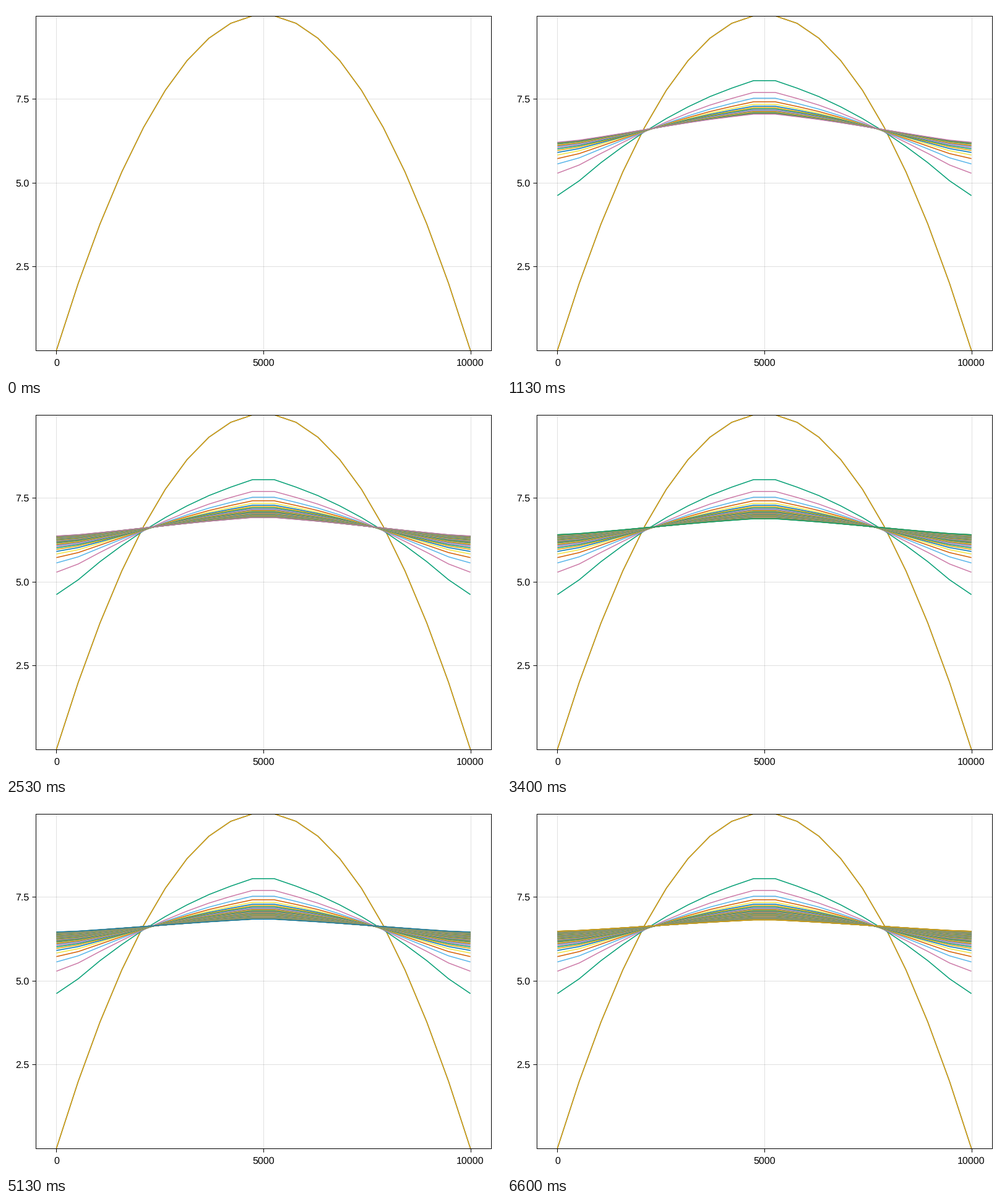
A matplotlib script for the animation above (6670 ms loop, 800x600 px).

```python
import matplotlib.pyplot as plt
import numpy as np
from matplotlib.animation import FuncAnimation

W, H, DPI = 800, 600, 100
FRAMES, LOOP_MS = 100, 6670
NODES, LENGTH = 20, 10000
PALETTE = ["#0072B2", "#E69F00", "#009E73", "#CC79A7",
           "#56B4E9", "#D55E00", "#F0E442"]


def px(n):
    """Pixels to points."""
    return n * 72 / DPI


def flow(h):
    """Shallow-ice rate of change (n = 3, unit cells) and peak diffusivity."""
    slope = np.diff(h)
    at_nodes = np.concatenate(([slope[0]], (slope[1:] + slope[:-1]) / 2, [slope[-1]]))
    mean = lambda v: (v[1:] + v[:-1]) / 2
    diff = mean(at_nodes ** 2) * mean(h ** 5)
    flux = diff * slope
    rate = np.diff(np.concatenate(([0], flux, [0])))
    rate[[0, -1]] *= 2  # half cells at both ends
    return rate, diff.max()


def simulate(h, end_level):
    """Heun steps until the margin has risen to end_level."""
    t, times, states = 0.0, [0.0], [h]
    while h[0] < end_level:
        rate, peak = flow(h)
        dt = 0.04 / peak
        h = h + dt * (rate + flow(h + dt * rate)[0]) / 2
        t += dt
        times.append(t)
        states.append(h)
    return np.array(times), np.array(states)


x = np.linspace(0, LENGTH, NODES)
start = 10 * (1 - (2 * x / LENGTH - 1) ** 2)
times, states = simulate(start, 6.52)
step = np.interp(5.282, states[:, 0], times) / 2  # margin height after two steps
when = np.arange(FRAMES) * step
profiles = np.column_stack([np.interp(when, times, col) for col in states.T])
profiles = np.vstack([start, profiles])

plt.rcParams.update({"font.family": "Liberation Sans", "font.size": px(16),
                     "text.hinting": "none", "axes.linewidth": px(1)})
fig = plt.figure(figsize=(W / DPI, H / DPI), dpi=DPI, facecolor="white")
ax = fig.add_axes([48 / W, 43 / H, 736 / W, 541 / H])
ax.set_xlim(-0.05 * LENGTH, 1.05 * LENGTH)
ax.set_ylim(0, start.max())
ax.set_xticks([0, 5000, 10000], ["0", "5000", "10000"])
ax.set_yticks([2.5, 5, 7.5], ["2.5", "5.0", "7.5"])
ax.set_axisbelow(True)
ax.grid(color="black", alpha=0.12, linewidth=px(1))
ax.tick_params(length=px(6), width=px(1))
ax.tick_params(axis="x", pad=px(6.8))
ax.tick_params(axis="y", pad=px(4.5))

lines = [ax.plot(x, h, color=PALETTE[i % len(PALETTE)], linewidth=px(1.5),
                 solid_capstyle="butt", solid_joinstyle="miter")[0]
         for i, h in enumerate(profiles)]


def update(frame):
    for i, line in enumerate(lines):
        line.set_visible(i <= frame + 1)
    return lines


anim = FuncAnimation(fig, update, frames=FRAMES, interval=LOOP_MS / FRAMES,
                     repeat=True, repeat_delay=0, blit=False)
plt.show()
```
